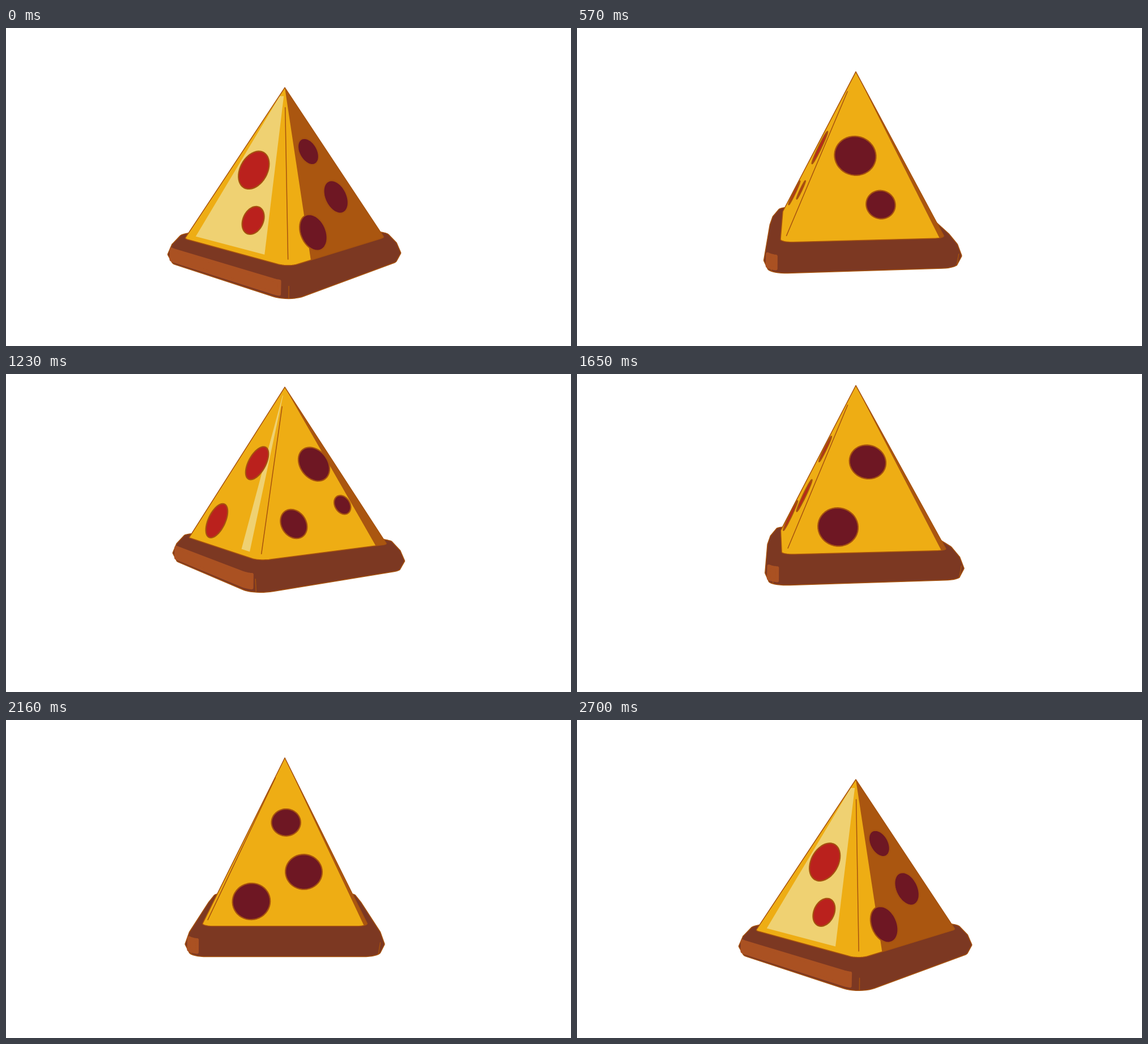
Animation of 997 by 561 pixels, one loop 2730 ms. Source, as an HTML page with a canvas:

```html
<!DOCTYPE html>
<html lang="en">
<head>
<meta charset="utf-8">
<title>Pizza pyramid</title>
<style>
  html, body { margin: 0; width: 100%; height: 100%; overflow: hidden; background: #fff; }
  canvas { display: block; }
</style>
</head>
<body>
<canvas id="stage" width="997" height="561"></canvas>
<script>
const ctx = document.getElementById('stage').getContext('2d');
const LOOP = 2730, STEP = 30, RISE = 1490, LIFT = 84;
const DIST = 1050, PITCH = 9 * Math.PI / 180;
const APEX = 172.5, HEIGHT = 263.5, HALF = 131, BASE = APEX - HEIGHT;
const YELLOW = '#eead14', PALE = '#efd172', BROWN = '#aa5610', LINE = '#a6520f';
const RED = '#ba211d', WINE = '#6e1723', CRUST = '#7c3822', CRUST_LIT = '#aa5122';

// time, degrees turned, degrees per ms
const TURN = [[0, 0, 0], [570, 49.4, .14], [1230, 166.7, .167], [1650, 230.9, .158],
  [1950, 280.4, .158], [2400, 344.4, .1], [LOOP, 360, 0]];
// slices on each face: offset from the middle, share of the height, radius
const SLICES = [
  [[-8, .52, 34], [29, .805, 23.5]],
  [[2, .405, 24], [30.5, .696, 29.5], [-53, .863, 29.8]],
  [[11.3, .48, 30], [-42.7, .855, 31.5]],
  [[16.5, .486, 30.5], [-54, .825, 24], [51, .74, 16.7]]
];
// crust profile: half side, corner radius, height
const PROFILE = [[131, 20, -91], [139, 24, -88], [151, 30, -103], [157, 32, -120], [152, 32, -134]];
// shade borders across a face, by the direction it looks
const PALE_FROM = [[-62, .9], [-57, .78], [-49, .14], [-34, .08], [-22, .08]];
const PALE_TO = [[-62, .9], [-57, .88], [-47, .8], [-34, .59], [-22, .08]];
const BROWN_FROM = [[-10, 1], [5, .96], [33, .89], [38, .5], [47, .18], [57, .05], [70, 0]];

let lift = 0;

const sin = deg => Math.sin(deg * Math.PI / 180);
const cos = deg => Math.cos(deg * Math.PI / 180);
const wrap = deg => ((deg + 180) % 360 + 360) % 360 - 180;
const ease = u => (1 - Math.cos(Math.PI * u)) / 2;

function ramp(points, x) {
  if (x <= points[0][0]) return points[0][1];
  for (let i = 1; i < points.length; i++) {
    const [x0, y0] = points[i - 1], [x1, y1] = points[i];
    if (x <= x1) return y0 + (y1 - y0) * (x - x0) / (x1 - x0);
  }
  return points[points.length - 1][1];
}

function turnAt(t) {
  const i = TURN.findIndex(key => t < key[0]);
  const [t0, a0, s0] = TURN[i - 1], [t1, a1, s1] = TURN[i];
  const d = t1 - t0, u = (t - t0) / d, w = 1 - u;
  return a0 * w * w * (1 + 2 * u) + a1 * u * u * (3 - 2 * u) + d * u * w * (s0 * w - s1 * u);
}

function project(x, y, z) {
  y += lift;
  const up = y * Math.cos(PITCH) - z * Math.sin(PITCH);
  const near = y * Math.sin(PITCH) + z * Math.cos(PITCH);
  const scale = DIST / (DIST - near);
  return [492 + x * scale, 280 - up * scale];
}

// point on the face that looks in direction dir
function onFace(dir, x, v) {
  const z = HALF * v;
  return project(x * cos(dir) + z * sin(dir), APEX - HEIGHT * v, z * cos(dir) - x * sin(dir));
}

// outline of a rounded square, limited to normals between lo and hi
function ring([half, radius, y], corner, lo = -360, hi = 360) {
  const points = [], reach = (half - radius) * Math.SQRT2;
  for (let k = 0; k < 4; k++) {
    const mid = corner + 90 * k;
    if (mid - 45 > hi || mid + 45 < lo) continue;
    for (let d = -45; d <= 45; d += 9) {
      const n = Math.min(hi, Math.max(lo, mid + d));
      points.push(project(reach * sin(mid) + radius * sin(n), y, reach * cos(mid) + radius * cos(n)));
    }
  }
  return points;
}

const cross = (o, a, b) => (a[0] - o[0]) * (b[1] - o[1]) - (a[1] - o[1]) * (b[0] - o[0]);

function hull(points) {
  points.sort((a, b) => a[0] - b[0] || a[1] - b[1]);
  const half = list => {
    const out = [];
    for (const p of list) {
      while (out.length > 1 && cross(out[out.length - 2], out[out.length - 1], p) <= 0) out.pop();
      out.push(p);
    }
    return out.slice(0, -1);
  };
  return [...half(points), ...half(points.slice().reverse())];
}

function shape(points, fill, stroke, width = 1.5) {
  ctx.beginPath();
  points.forEach(p => ctx.lineTo(...p));
  if (fill) {
    ctx.closePath();
    ctx.fillStyle = fill;
    ctx.fill();
  }
  if (stroke) {
    ctx.strokeStyle = stroke;
    ctx.lineWidth = width;
    ctx.stroke();
  }
}

function drawCrust(corner) {
  shape(hull(PROFILE.flatMap(p => ring(p, corner))), CRUST, LINE);
  for (let k = 0; k < 4; k++) {
    const dir = corner + 90 * k;
    if (Math.abs(dir) > 60) continue;
    const edge = (r, y) => project(r * sin(dir), y, r * cos(dir));
    shape([edge(208, -113), edge(205, -132)], null, LINE);
  }
  const top = ring([153, 31, -108], corner, -61, -24);
  const bottom = ring([154, 32, -127], corner, -61, -24);
  shape([...top, ...bottom.reverse()], CRUST_LIT, CRUST_LIT, 6);
}

function drawShade(dir, rise) {
  const band = (from, to, v0, v1) => {
    const at = (f, v) => onFace(dir, (2 * f - 1) * HALF * v, v);
    return [at(from, v0), at(to, v0), at(to, v1), at(from, v1)];
  };
  const glint = dir - 4 * (1 - rise);
  const from = ramp(PALE_FROM, glint), to = ramp(PALE_TO, glint);
  if (to - from > .01) shape(band(from, to, .055, .97), PALE);
  const dark = ramp(BROWN_FROM, dir);
  if (dark < 1) shape(band(dark, 1.02, 0, 1.02), BROWN);
}

function drawSlices(dir, slices) {
  const slant = Math.hypot(HEIGHT, HALF);
  for (const [x, v, r] of slices) {
    const rim = [];
    for (let a = 0; a < 360; a += 8) rim.push(onFace(dir, x + r * cos(a), v + r * sin(a) / slant));
    rim.push(rim[0]);
    shape(rim, dir < -15 ? RED : WINE, LINE, 2.2);
  }
}

function drawCheese(corner, turn, rise) {
  const outline = hull([project(0, APEX, 0), ...ring([HALF, 20, BASE], corner)]);
  const faces = SLICES.map((slices, k) => ({ slices, dir: wrap(turn - 43.4 + 90 * k) }))
    .filter(({ dir }) => cross(onFace(dir, 0, 0), onFace(dir, -HALF, 1), onFace(dir, HALF, 1)) < 0);
  shape(outline, YELLOW);
  ctx.save();
  ctx.clip();
  faces.forEach(({ dir }) => drawShade(dir, rise));
  ctx.restore();
  shape([...outline, outline[0]], null, LINE);
  for (let k = 0; k < 4; k++) {
    const dir = corner + 90 * k;
    if (Math.abs(dir) > 45) continue;
    const crease = v => project(177 * v * sin(dir), APEX - HEIGHT * v, 177 * v * cos(dir));
    shape([crease(.127), crease(.97)], null, LINE);
  }
  faces.forEach(({ dir, slices }) => drawSlices(dir, slices));
}

function draw(now) {
  const t = Math.floor(now % LOOP / STEP) * STEP;
  const turn = turnAt(t);
  const rise = ease(t < RISE ? t / RISE : (LOOP - t) / (LOOP - RISE));
  const corner = (turn + 1.6) % 90 - 180;
  lift = LIFT * rise;
  ctx.fillStyle = '#fff';
  ctx.fillRect(0, 0, 997, 561);
  ctx.lineJoin = ctx.lineCap = 'round';
  drawCrust(corner);
  drawCheese(corner, turn, rise);
}

const start = performance.now();
function tick() {
  draw(performance.now() - start);
  requestAnimationFrame(tick);
}
tick();
</script>
</body>
</html>
```
